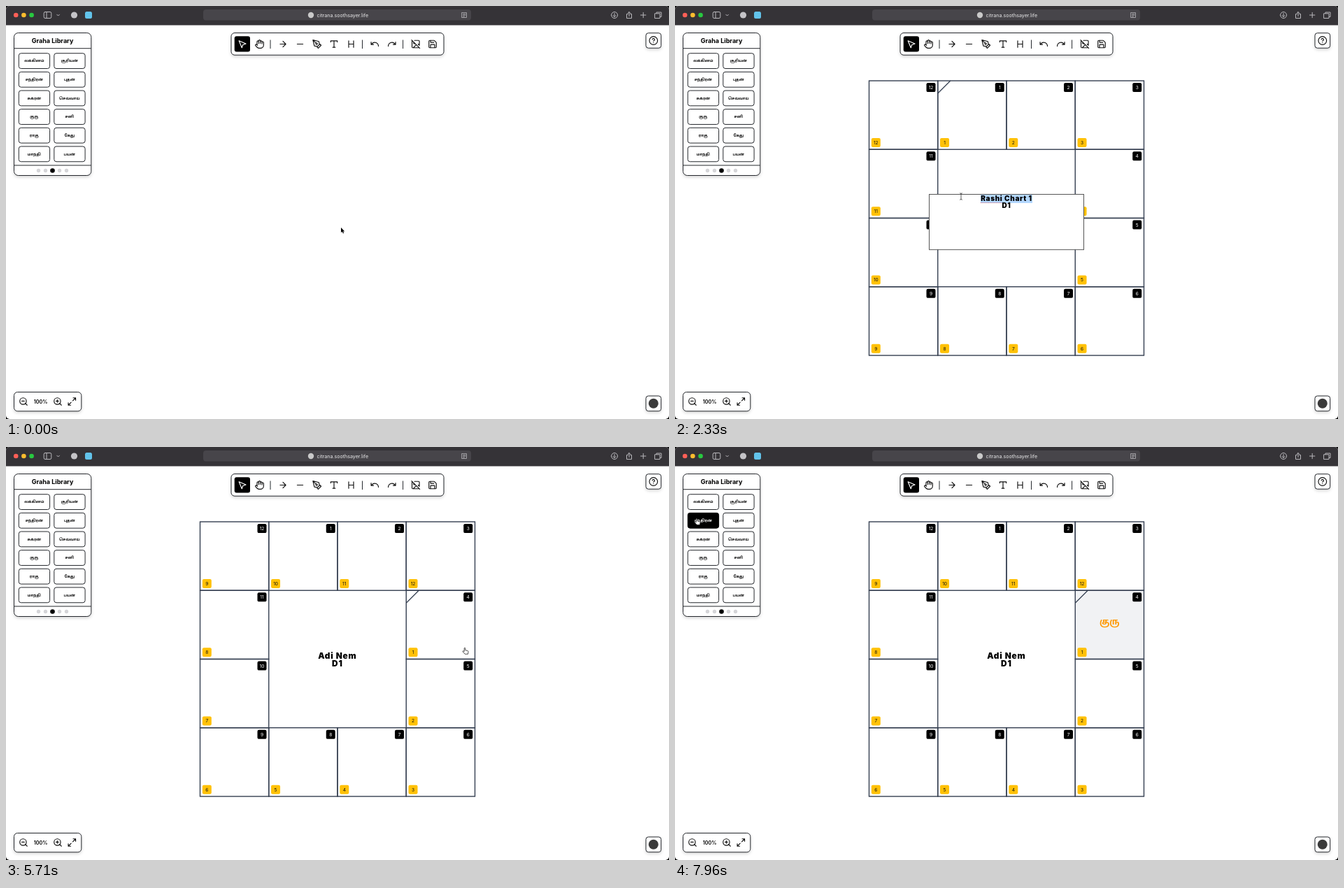
These frames come from a looping animation (948x591 px, 8000 ms). An HTML page:

```html
<!DOCTYPE html>
<html lang="en">
<head>
<meta charset="utf-8">
<title>Rashi chart editor</title>
<style>
  html, body { margin: 0; width: 100%; height: 100%; overflow: hidden; background: #000; }
  svg { display: block; width: 948px; height: 591px; }
  text { font-family: Inter, "Liberation Sans", sans-serif; text-anchor: middle; }
  .tamil { font-family: "Noto Sans Tamil", "Noto Sans", sans-serif; font-weight: 700; }
  .heavy { font-weight: 900; letter-spacing: .066em; }
  .panel { fill: #fff; stroke: #25282d; filter: drop-shadow(0 2px 2px rgba(0, 0, 0, .16)); }
  .line { fill: none; stroke: #25282d; }
  .icon { fill: none; stroke: #111; stroke-width: 2; stroke-linecap: round; stroke-linejoin: round; }
  .chrome { fill: none; stroke: #b9b8bc; stroke-linecap: round; stroke-linejoin: round; }
  .grid { fill: none; stroke: #353f51; stroke-width: 1.4; }
  .key rect { fill: #fff; stroke: #25282d; }
  .key { color: #111; }
  .key.over rect { fill: #000; stroke: #000; }
  .key.over { color: #fff; }
  .key.held rect { fill: #555; stroke: #555; }
  .key.held { color: #e4e4e4; }
  #ghost { color: #e6e6e6; filter: drop-shadow(0 1px 3px rgba(0, 0, 0, .25)); }
</style>
</head>
<body>
<svg id="stage" viewBox="0 0 948 591"></svg>
<script>
const LOOP = 8000;
const stage = document.getElementById('stage');

// --- drawing helpers ---
const rect = (x, y, w, h, r, attrs) =>
  `<rect x="${x}" y="${y}" width="${w}" height="${h}" rx="${r}" ${attrs}/>`;
const path = (d, attrs) => `<path d="${d}" ${attrs}/>`;
const dot = (x, y, r, fill) => `<circle cx="${x}" cy="${y}" r="${r}" fill="${fill}"/>`;
const text = (s, x, y, size, attrs = '') =>
  `<text x="${x}" y="${y}" font-size="${size}" ${attrs}>${s}</text>`;
const tamil = (s, x, y, size) =>
  text(s, x, y + size * .32, size, 'class="tamil" fill="currentColor"');
const group = (id, body, attrs = '') => `<g id="${id}" ${attrs}>${body}</g>`;
const ring = (x, y, r) => `M${x - r} ${y}a${r} ${r} 0 1 0 ${2 * r} 0a${r} ${r} 0 1 0 ${-2 * r} 0`;
const icon = (d, x, y, size = 14, attrs = '') =>
  path(d, `class="icon" transform="translate(${x - size / 2} ${y - size / 2}) scale(${size / 24})" ${attrs}`);

// --- browser bar ---
function browserBar() {
  const lights = ['#ff5f57', '#febc2e', '#28c840'].map((c, i) => dot(14.2 + 11.2 * i, 13, 3.3, c)).join('');
  const icons = 'M56 8.5h7q1.8 0 1.8 1.8v5.4q0 1.8-1.8 1.8h-7q-1.8 0-1.8-1.8v-5.4q0-1.8 1.8-1.8zM58 8.5v9' +
    'M72.8 12.2l1.8 1.8 1.8-1.8' + ring(870, 13, 4.5) + 'M870 10.5v5m-2-2l2 2 2-2' +
    'M889 11.5h-1.5v6h7v-6H893M891 14.5V8.5m-2 2l2-2 2 2M907.5 13h7.4M911.2 9.3v7.4' +
    'M930 10.5V9h7v6.5h-1.5M928 10.8h7v6.7h-7z';
  return rect(0, 0, 948, 27.5, 0, 'fill="#353337"') + lights +
    path(icons, 'class="chrome"') +
    dot(97.5, 13, 4.6, '#c4c3c7') + rect(113, 8, 10, 10, 2.5, 'fill="#62c3ea"') +
    rect(282, 5, 383, 15.5, 4, 'fill="#47454a"') + dot(436, 13, 4.2, '#c9c9c9') +
    text('citrana.soothsayer.life', 481.3, 15.7, 7.1, 'fill="#e9e9ea"') +
    path('M652 9.5h6.5v7H652zM653.5 11.5h3.5M653.5 13.2h3.5M653.5 15h2', 'class="chrome" stroke-width=".8"');
}

// --- library panel ---
const WORDS = ['லக்கினம்', 'சூரியன்', 'சந்திரன்', 'புதன்', 'சுக்ரன்', 'செவ்வாய்',
  'குரு', 'சனி', 'ராகு', 'கேது', 'மாந்தி', 'பயன்'];
const WORD_SIZE = 5.1;
const keyAt = i => [40.3 + 50.5 * (i % 2), 78.7 + 26.65 * (i >> 1)];

function library() {
  const keys = WORDS.map((word, i) => {
    const [x, y] = keyAt(i);
    return group('key' + i, rect(x - 22, y - 11, 44.3, 21.8, 3.2, '') + tamil(word, x, y, WORD_SIZE), 'class="key"');
  }).join('');
  const pages = [0, 1, 2, 3, 4].map(i =>
    dot(46.5 + 10 * i, 235.5, i === 2 ? 3.3 : 2.7, i === 2 ? '#000' : '#d5d5d8')).join('');
  return rect(11.5, 38.5, 110.3, 204, 6, 'class="panel"') +
    path('M11.5 60.7H121.8M11.5 228H121.8', 'class="line"') +
    text('Graha Library', 66.5, 53, 9, 'font-weight="700"') + keys + pages;
}

// --- tool bars ---
const LENS = ring(11, 11, 8) + 'M21 21l-4.35-4.35M8 11h6';
const TOOLS = [
  [362.5, 'M18 11V6a2 2 0 0 0-4 0M14 10V4a2 2 0 0 0-4 0v2M10 10.5V6a2 2 0 0 0-4 0v8M18 8a2 2 0 1 1 4 0v6a8 8 0 0 1-8 8h-2c-2.8 0-4.5-.86-5.99-2.34l-3.6-3.6a2 2 0 0 1 2.83-2.82L7 15'],
  [396, 'M5 12h14M12 5l7 7-7 7'],
  [420.5, 'M5 12h14'],
  [444.7, 'M12 19l7-7 3 3-7 7zM18 13l-1.5-7.5L2 2l3.5 14.5L13 18zM2 2l7.6 7.6' + ring(11, 11, 2)],
  [469, 'M4 7V4h16v3M9 20h6M12 4v16'],
  [493.5, 'M6 12h12M6 20V4M18 20V4'],
  [527.3, 'M3 7v6h6M21 17a9 9 0 0 0-9-9 9 9 0 0 0-6 2.3L3 13'],
  [551.8, 'M21 7v6h-6M3 17a9 9 0 0 1 9-9 9 9 0 0 1 6 2.3l3 2.7'],
  [585.8, 'M2 2l20 20M10.4 10.4a2 2 0 1 1-2.8-2.8M13.5 13.5L6 21M18 12l3 3M3.6 3.6A2 2 0 0 0 3 5v14a2 2 0 0 0 2 2h14c.5 0 1-.2 1.4-.6M21 15V5a2 2 0 0 0-2-2H9'],
  [610, 'M15.2 3a2 2 0 0 1 1.4.6l3.8 3.8a2 2 0 0 1 .6 1.4V19a2 2 0 0 1-2 2H5a2 2 0 0 1-2-2V5a2 2 0 0 1 2-2zM17 21v-7a1 1 0 0 0-1-1H8a1 1 0 0 0-1 1v7M7 3v4a1 1 0 0 0 1 1h7']
];

function toolBars() {
  return rect(322, 38.5, 304, 31.7, 5, 'class="panel"') +
    rect(326.7, 43.3, 22.3, 22.3, 3, 'fill="#000"') +
    icon('M4 4l7.1 17 2.5-7.4L21 11.1z', 337.8, 54.5, 14, 'style="stroke:#fff"') +
    TOOLS.map(([x, d]) => icon(d, x, 54.5)).join('') +
    path('M378 48.5v12.5M509.5 48.5v12.5M567.6 48.5v12.5', 'class="line"') +
    rect(915, 38.7, 21.7, 21.5, 3.5, 'class="panel"') +
    icon(ring(12, 12, 10) + 'M9.1 9a3 3 0 0 1 5.8 1c0 2-3 3-3 3M12 17h.01', 925.8, 49.5) +
    rect(915, 558, 21.7, 21.7, 3.5, 'class="panel"') + dot(925.8, 568.8, 7, '#3a3a3a') +
    rect(11.5, 552.5, 96.3, 27.3, 5, 'class="panel"') +
    icon(LENS, 25, 566) + icon(LENS + 'M11 8v6', 74, 566) +
    icon('M15 3h6v6M9 21H3v-6M21 3l-7 7M3 21l7-7', 94.3, 566) +
    text('100%', 49.5, 568.6, 7.2, 'font-weight="600"');
}

// --- chart: signs run clockwise, 12 in the top left corner ---
const CELL = 98.25, LEFT = 277.5, TOP = 107, CORNER = 18;
function signCell(sign) {
  const i = sign % 12, side = Math.floor(i / 3), k = i % 3;
  const [c, r] = [[k, 0], [3, k], [3 - k, 3], [0, 3 - k]][side];
  return [LEFT + c * CELL, TOP + r * CELL];
}
const SIGNS = Array.from({ length: 12 }, (_, i) => i + 1);
const badge = (n, x, y, fill, ink) =>
  rect(x - 6.5, y - 6.5, 13, 13, 2.2, `fill="${fill}"`) + text(n, x, y + 2.4, 6.6, `fill="${ink}"`);

function houses(lagna) {
  const [lx, ly] = signCell(lagna);
  return SIGNS.map(s => {
    const [x, y] = signCell(s);
    return badge((s - lagna + 12) % 12 + 1, x + 9.8, y + 88.4, '#ffc107', '#111');
  }).join('') + path(`M${lx} ${ly + CORNER}L${lx + CORNER} ${ly}`, 'class="grid" style="stroke-width:1.2"');
}

function chart() {
  const [gx, gy] = signCell(4);
  const boxes = SIGNS.map(s => {
    const [x, y] = signCell(s);
    return rect(x, y, CELL, CELL, 0, 'class="grid"');
  }).join('');
  const signs = SIGNS.map(s => {
    const [x, y] = signCell(s);
    return badge(s, x + 88.5, y + 9.6, '#000', '#fff');
  }).join('');
  return rect(LEFT, TOP, 4 * CELL, 4 * CELL, 0, 'fill="#fff"') +
    group('shade', rect(gx, gy, CELL, CELL, 0, 'fill="#f1f2f4"')) +
    boxes + signs + group('first', houses(1)) + group('turned', houses(4)) +
    text('', 473.8, 302.6, 11.8, 'id="title" class="heavy"') +
    text('D1', 473.8, 314.3, 11.8, 'class="heavy"') +
    group('placed', tamil('குரு', 621.3, 250, 12.2), 'color="#ff9800"');
}

const editor = () =>
  rect(363.5, 269.5, 221, 79.2, 0, 'fill="#fff" stroke="#555"') +
  rect(437, 270, 74, 12, 0, 'id="mark" fill="#b3d7fe"') +
  text('', 474, 279.2, 10, 'id="field" class="heavy"') +
  path('M437 281.6H467', 'id="spell" stroke="#e0524d" stroke-width=".9" stroke-dasharray="1 1.2"') +
  text('D1', 474, 289.4, 10, 'class="heavy"') +
  path('M0 270.5V281.5', 'id="caret" stroke="#999" stroke-width=".8"');

const pointers = () =>
  '<circle id="press" r="12" fill="#fff" fill-opacity=".45" stroke="#111"/>' +
  path('M0 0V7.3L1.7 5.8 2.9 8.4 4.1 7.9 3 5.4H5.2Z', 'id="arrow" fill="#000" stroke="#fff" stroke-width=".7" paint-order="stroke"') +
  path('M-1.8-4.8Q0-4.8 0-3.6V3.6Q0 4.8-1.8 4.8M1.8-4.8Q0-4.8 0-3.6M0 3.6Q0 4.8 1.8 4.8', 'id="beam" fill="none" stroke="#333" stroke-width=".8"') +
  path('M-1.8-3.8c0-1.2 1.6-1.2 1.6 0v2.6l3 .7c1 .3 1.3.8 1.2 1.6l-.5 3.2H-.8L-3.8.9c-.5-.9.4-1.5 1.2-.8l.8.7z', 'id="hand" fill="#fff" stroke="#222" stroke-width=".8"');

stage.innerHTML = '<clipPath id="frame"><rect width="948" height="591" rx="5"/></clipPath><g clip-path="url(#frame)">' +
  rect(0, 0, 948, 591, 0, 'fill="#fff"') + browserBar() + group('chart', chart()) +
  library() + toolBars() + group('editor', editor()) +
  group('ghost', rect(-22.2, -11, 44.4, 22, 2.5, 'fill="#111"') + tamil('குரு', 0, 0, WORD_SIZE)) +
  group('cursor', pointers()) + '</g>';

const $ = Object.fromEntries([...stage.querySelectorAll('[id]')].map(e => [e.id, e]));

// --- motion: time, x, y, optional bow of the path that leads there ---
const PATH = [
  [0, 479, 317], [420, 492, 336], [860, 476, 301], [1250, 476, 301], [1630, 508, 272.5],
  [1750, 508, 272.5], [2040, 409, 272.5], [4040, 409, 272.5], [4220, 434.5, 260], [4630, 434.5, 260],
  [5000, 625, 250], [5120, 625, 250], [5420, 657, 292], [5800, 657, 292], [6080, 607, 246],
  [6250, 607, 246], [6620, 55, 168], [6714, 55, 168], [7314, 636, 267, -16],
  [7380, 636, 267], [7880, 32, 107], [LOOP, 32, 107]
];
function cursorAt(t) {
  const i = Math.max(1, PATH.findIndex(p => p[0] > t));
  const [t0, x0, y0] = PATH[i - 1], [t1, x1, y1, bow = 0] = PATH[i];
  const u = (t - t0) / (t1 - t0), e = u * u * (3 - 2 * u);
  return [x0 + (x1 - x0) * e, y0 + (y1 - y0) * e + bow * Math.sin(Math.PI * e)];
}

const CLICKS = [[930, 1040], [1100, 1210], [1750, 2060], [4300, 4420], [5430, 5540], [6660, 7360]];
const NAME = 'Adi Nem';
const TYPED = [2750, 2960, 3210, 3290, 3540, 3660, 3790];
const show = (el, on) => el.setAttribute('visibility', on ? 'inherit' : 'hidden');
const move = (el, x, y) => el.setAttribute('transform', `translate(${x} ${y})`);
const setText = (el, s) => { if (el.textContent !== s) el.textContent = s; };

function draw(t) {
  const within = (a, b) => t >= a && t < b;
  const [x, y] = cursorAt(t);
  const typed = TYPED.filter(k => t >= k).length;
  const name = typed ? NAME.slice(0, typed) : 'Rashi Chart 1';
  const editing = within(1240, 4340), dragging = within(6725, 7360);

  show($.chart, t >= 440);
  show($.first, t >= 440 && t < 5460);
  show($.turned, t >= 5460);
  show($.shade, t >= 5900);
  show($.placed, t >= 7360);
  setText($.title, name);

  show($.editor, editing);
  setText($.field, name);
  const from = Math.min(511, Math.max(437, x));
  show($.mark, editing && within(1750, 2750));
  $.mark.setAttribute('x', from);
  $.mark.setAttribute('width', 511 - from);
  show($.spell, editing && !typed);
  show($.caret, editing && typed > 0);
  if (editing && typed) move($.caret, 474.5 + $.field.getComputedTextLength() / 2, 0);

  $.key6.setAttribute('class', dragging ? 'key held' : within(6570, 6725) ? 'key over' : 'key');
  const [kx, ky] = keyAt(6);
  $.key6.setAttribute('transform', dragging ? `translate(${kx * .06} ${ky * .06}) scale(.94)` : '');
  $.key2.setAttribute('class', t >= 7900 ? 'key over' : 'key');
  const [gx, gy] = cursorAt(t - 18);
  show($.ghost, dragging);
  move($.ghost, gx - 15.5, gy - 8.5);

  const beam = within(1300, 4100);
  const hand = within(5250, 5820) || within(6570, 6680) || t >= 7860;
  move($.cursor, x, y);
  show($.cursor, !within(2750, 4040));
  show($.beam, beam);
  show($.hand, hand);
  show($.arrow, !beam && !hand);
  show($.press, CLICKS.some(([a, b]) => within(a, b)));
  $.press.setAttribute('r', beam ? 10 : 12);
}

function tick() {
  draw(performance.now() % LOOP);
  requestAnimationFrame(tick);
}
tick();
</script>
</body>
</html>
```
